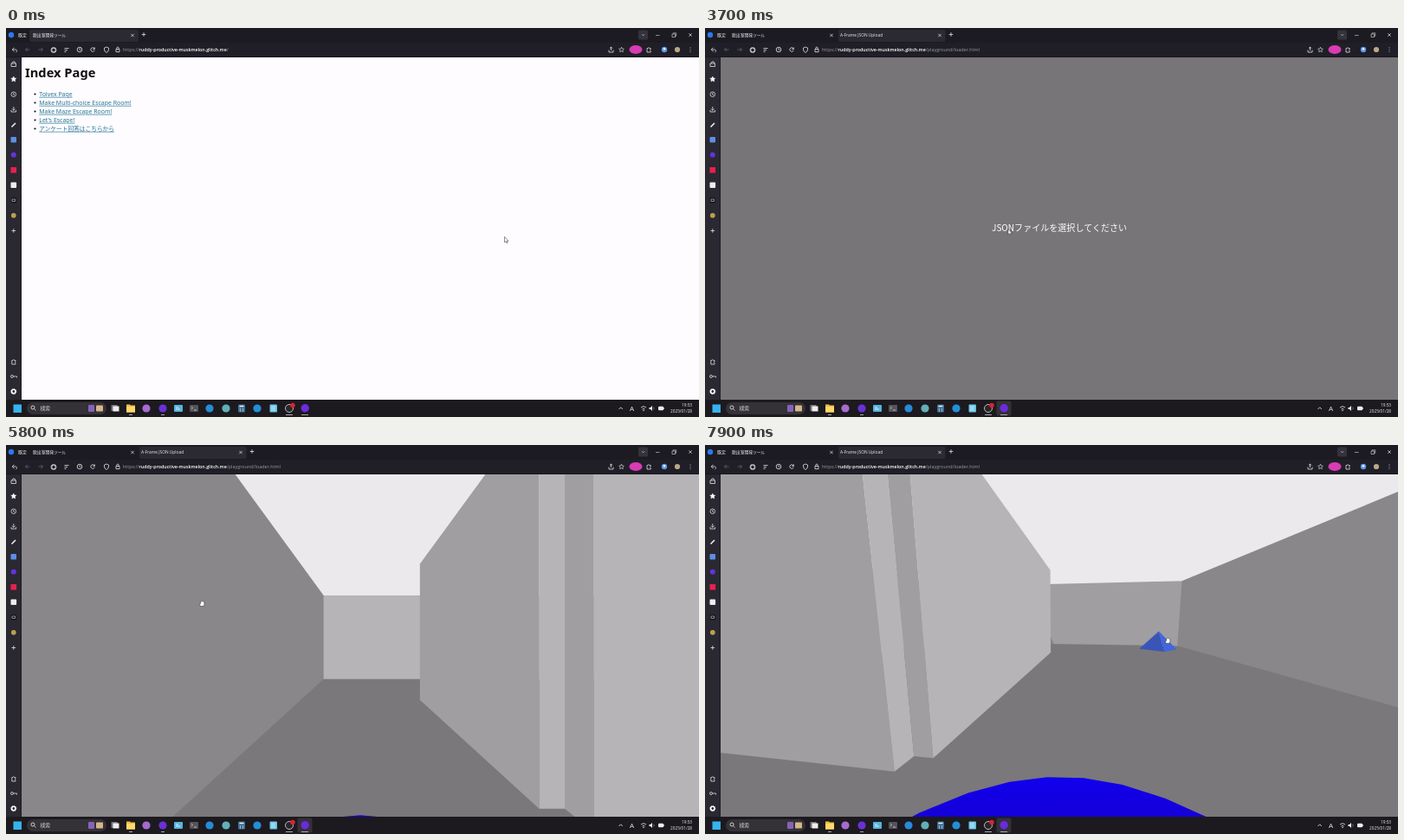
Animation, 800 px wide and 450 px high, one loop 8000 ms. Source, as an HTML page:

```html
<!DOCTYPE html>
<html lang="ja">
<head>
<meta charset="utf-8">
<style>
html, body { margin: 0; width: 100%; height: 100%; overflow: hidden; background: #1c1b22; }
svg { display: block; width: 800px; height: 450px; }
text { font-family: "Open Sans", "Noto Sans CJK JP", "Noto Sans CJK", sans-serif; font-feature-settings: "palt"; white-space: pre; }
.page { font-family: "Noto Sans", "Noto Sans CJK JP", "Noto Sans CJK", sans-serif; font-feature-settings: normal; }
.prompt { font-family: "Noto Sans CJK JP", "Noto Sans CJK", sans-serif; font-feature-settings: normal; }
</style>
</head>
<body>
<svg id="stage" viewBox="0 0 800 450"></svg>
<script>
const LOOP = 8000;
const TAB_OPEN = 1200, PAGE_READY = 2000, DIALOG_OPEN = 4100, DIALOG_CLOSE = 5250;
const HOST = "ruddy-productive-muskmelon.glitch.me";

const rect = (x, y, w, h, fill, more = "") => `<rect x="${x}" y="${y}" width="${w}" height="${h}" fill="${fill}" ${more}/>`;
const circle = (x, y, r, fill, more = "") => `<circle cx="${x}" cy="${y}" r="${r}" fill="${fill}" ${more}/>`;
const text = (x, y, size, fill, str, more = "") => `<text x="${x}" y="${y}" font-size="${size}" fill="${fill}" ${more}>${str}</text>`;
const line = (d, color = "#e4e2e6", width = 0.8) => `<path d="${d}" fill="none" stroke="${color}" stroke-width="${width}" stroke-linejoin="round"/>`;
const shape = (d, fill) => `<path d="${d}" fill="${fill}"/>`;
const group = (id, body) => `<g id="${id}">${body}</g>`;
const cross = (x, y, r = 1.7, width = 0.7) => line(`M${x - r} ${y - r}l${2 * r} ${2 * r}m0 ${-2 * r}l${-2 * r} ${2 * r}`, "#eee", width);
const plus = (x, y, r = 2.3) => line(`M${x - r} ${y}h${2 * r}M${x} ${y - r}v${2 * r}`);
const arrow = (x, y, dir, color) => line(`M${x - 2.5 * dir} ${y}h${5 * dir}m${-2.2 * dir} -2.2l${2.2 * dir} 2.2l${-2.2 * dir} 2.2`, color);
const chevron = (x, y, color = "#ccc") => line(`M${x - 1.5} ${y - 0.7}l1.5 1.5l1.5 -1.5`, color, 0.6);
const reload = (x, y, r = 2.3) => line(`M${x + r} ${y - 0.8}A${r} ${r} 0 1 0 ${x + r} ${y + 0.8}M${x + r} ${y - 2.6}v2h-2`);
const puzzle = (x, y) => line(`M${x - 2} ${y - 1.5}h1.2q.8 -2 1.6 0h1.4v1.5q-1.6 .7 0 1.5v1.5h-4.2z`);
const star = (x, y, r, fill) => {
  const pts = Array.from({ length: 10 }, (_, i) => {
    const a = i * Math.PI / 5, q = i % 2 ? r * 0.48 : r;
    return `${x + q * Math.sin(a)},${y - q * Math.cos(a)}`;
  });
  return `<polygon points="${pts.join(" ")}" fill="${fill}" stroke="#eee" stroke-width=".6"/>`;
};

function browserFrame() {
  return rect(0, 0, 800, 34, "#1c1b22") + rect(0, 17, 800, 17, "#201f27") + rect(0, 34, 18, 396, "#2a2831")
    + line("M17.7 34V430M0 33.7H800", "#15141a", 0.6)
    + circle(6, 8, 3.2, "#2b79ee") + text(14, 10.2, 4.9, "#eee", "既定")
    + rect(730, 2.5, 11, 11, "#34323b", 'rx="1.5"') + chevron(735.7, 8, "#fff")
    + line("M750 8.5h4.5M769 7h3.5v3.5h-3.5zM770.2 7V5.8h3.5v3.5h-1.2", "#ddd", 0.6) + cross(790, 8)
    + line("M7.5 25h4a1.6 1.6 0 0 1 0 3M9.5 22.7l-2.3 2.3l2.3 2.2") + arrow(25, 25, -1, "#66646d") + arrow(40, 25, 1, "#66646d")
    + line("M53 23h4v5h-4zM52 25.5a3 2.5 0 0 1 6 0a3 2.5 0 0 1-6 0M67.5 23.5h5M67.5 25.5h3.5M67.5 27.5h2")
    + circle(85, 25, 2.8, "none", 'stroke="#eee" stroke-width=".8"') + line("M85 23.3V25l1.3 .7")
    + line("M698.5 26V22m-1.6 1.6l1.6-1.6l1.6 1.6M696 25.5v2.5h5v-2.5") + star(710.5, 25.2, 3, "none")
    + `<ellipse cx="727" cy="25" rx="7.5" ry="5" fill="#d83cb5"/>` + puzzle(742, 25)
    + circle(760, 25, 3.2, "#5e98e8") + circle(760, 24.2, 1.2, "#fff") + circle(775, 25, 3.1, "#b9a887")
    + [22.7, 25, 27.3].map(y => circle(790, y, 0.5, "#ddd")).join("");
}

function sidebar() {
  return line("M6 41h5.5v3.5h-5.5zM7 41l1-2h2l1 2") + star(8.8, 59.3, 3.2, "#fff")
    + circle(8.8, 76.7, 2.8, "none", 'stroke="#ddd" stroke-width=".8"') + line("M8.8 75v2l1.3 .6")
    + line("M8.8 91v4.3m-1.8-1.8l1.8 1.8l1.8-1.8M6 95v2h5.6v-2") + line("M6.5 114.5l4.5-4.5", "#eee", 1.6)
    + rect(5.5, 126, 6.5, 6.5, "#5d8ee4", 'rx="1"') + circle(8.8, 146.7, 3, "#6632df") + rect(5.5, 161, 6.6, 6.6, "#e9204f")
    + rect(5.5, 178.5, 6.6, 6.6, "#eee", 'rx="1"') + rect(5.8, 196.2, 6, 6, "#111015", 'rx="1.2"')
    + line("M7 198h3.6v2.5h-3.6z", "#ddd", 0.6) + circle(8.8, 216.8, 2.9, "#bba04f") + plus(8.8, 234.5)
    + puzzle(8.8, 386) + circle(7, 403, 1.5, "none", 'stroke="#ddd" stroke-width=".8"') + line("M8.5 403h4v1.5")
    + circle(8.8, 420.5, 2.2, "none", 'stroke="#fff" stroke-width="1.6"')
    + circle(8.8, 420.5, 3.1, "none", 'stroke="#fff" stroke-width=".8" stroke-dasharray="1.2 1.2"');
}

function taskbar() {
  const apps = [[162, "#a56bd0"], [181, "#6930d8"], [235, "#268bd8"], [254, "#63aeb8"], [290, "#238fd7"]];
  return rect(0, 430, 800, 20, "#1c1a1e") + rect(8.5, 435.5, 9.5, 9.5, "#36b2ee")
    + rect(24, 433, 92, 14, "#343237", 'rx="7"') + circle(31, 439, 2, "none", 'stroke="#eee" stroke-width=".8"') + line("M32.5 440.5l2 2")
    + text(39.5, 442, 5.8, "#d4d2d6", "検索") + rect(95, 436, 7, 8, "#8762b9", 'rx="1"') + rect(104, 436.5, 8, 7, "#d6b689", 'rx="1"')
    + rect(121.5, 436, 7, 7, "#77757a") + rect(123.5, 437.5, 7, 6, "#eee")
    + shape("M139 435.5h4l1 1h5v8h-10z", "#efbd3e") + rect(139, 438, 10, 6.5, "#ffd86c", 'rx=".6"')
    + apps.map(([x, c]) => circle(x, 440, 4.6, c)).join("")
    + rect(194, 436, 10, 8, "#56b4dc", 'rx="1"') + line("M196 439h3M196 441h5", "#fff")
    + rect(212, 436, 10, 8, "#55535a", 'rx="1"') + line("M214 438l1.5 1.5l-1.5 1.5M217 442h3", "#fff", 0.6)
    + rect(268, 435.5, 8, 9, "#3e6f94", 'rx="1"') + line("M269.5 437.5h5", "#eee", 1.5) + line("M270 441h1m2 0h1m-4 2h1m2 0h1", "#eee", 1)
    + rect(304.5, 435.5, 8.5, 9, "#6ac4e4", 'rx="1"') + line("M306 438h5m-5 2h5m-5 2h5", "#e9faff", 0.7)
    + circle(327, 440, 4.5, "#28262b", 'stroke="#ddd" stroke-width=".8"') + circle(331, 436.5, 2.7, "#df2235")
    + group("activeApp", rect(336.5, 431.5, 17, 17, "#343137", 'rx="2"')) + circle(345.2, 439.8, 4.7, "#6a2be0")
    + [[144, 2], [181, 2], [327, 4], [345, 4]].map(([x, r]) => line(`M${x - r} 447.5h${2 * r}`, "#aaa8b1", 1)).join("")
    + line("M707.5 441l2.2-2.2l2.2 2.2", "#eee") + text(720, 443, 8, "#eee", "A")
    + line("M733 439a4.5 4.5 0 0 1 6 0M734.5 441a2.5 2.5 0 0 1 3 0", "#eee") + circle(736, 442.5, 0.7, "#eee")
    + shape("M742.5 439h1.5l2-2v6l-2-2h-1.5z", "#eee") + line("M747.5 438.5q1.5 1.5 0 3", "#aaa", 0.6)
    + rect(753, 437.7, 6, 4.5, "#eee", 'rx="1"') + rect(759.3, 439, 0.7, 2, "#eee")
    + text(792, 438.4, 4.7, "#f1eff3", "19:53", 'text-anchor="end"') + text(792, 445.3, 4.7, "#f1eff3", "2025/01/28", 'text-anchor="end"');
}

function indexPage() {
  const links = ["Tolvex Page", "Make Multi-choice Escape Room!", "Make Maze Escape Room!", "Let's Escape!", "アンケート回答はこちらから"];
  return rect(18, 34, 782, 396, "#fefcfe") + text(22, 57, 14.7, "#111", "Index Page", 'class="page" font-weight="700"')
    + links.map((s, i) => circle(33.5, 76.5 + 10 * i, 1.1, "#111")
      + text(38.3, 78.8 + 10 * i, i === 4 ? 6.7 : 6.93, "#287698", s, 'class="page" text-decoration="underline"')).join("");
}

const tabTitle = (x, str) => text(x, 10.2, 4.85, "#f0eef2", str);
const shield = line("M116 22l2.5 1v2q0 2.2-2.5 3.5q-2.5-1.3-2.5-3.5v-2z");
const lock = line("M127 24.5h4v3.2h-4zM127.8 24.5v-1.2a1.2 1.2 0 0 1 2.4 0v1.2");
const url = (x, path) => text(x, 27, 5.45, "#9b99a2", `https://<tspan fill="#fff" font-size="5.3" font-weight="600">${HOST}</tspan>${path}`);

const fileRows = [
  [67, "昨日"], [78, "multiChoice_registry_2025-01-27_08-54-37.json", "2025/01/27 17:54"],
  [87, "multiChoice_registry_2025-01-27_08-32-14.json", "2025/01/27 17:32"],
  [98, "先週"], [109, "maze_registry_2025-01-21_11-38-06.json", "2025/01/21 20:38"],
  [120, "かなり前"], [131, "multiChoice_registry_2024-10-09_05-53-26.json", "2024/10/09 14:53"]
];

function fileDialog() {
  const white = "#f4f2f5";
  const label = (x, y, s, size = 4.5) => text(x, y, size, white, s);
  const box = (x, y, w, h, stroke) => rect(x, y, w, h, "#1b191c", `stroke="${stroke}" stroke-width=".7" rx="1"`);
  const row = ([y, name, date]) => date
    ? shape(`M79 ${y - 3}h3l1.5 1.5v4.5h-4.5z`, "#e6e4e8") + text(86, y + 1.7, 4.66, white, name)
      + text(302.5, y + 1.7, 4.66, white, date) + label(362.5, y + 1.7, "JSON ソース ファイ", 4.4)
    : chevron(75, y) + label(79, y + 2, name, 5.4);
  const places = [[85, "デスクトップ", "#33a3d6"], [95, "ダウンロード", "#43af96"], [105, "ドキュメント", "#7199ba"], [115, "G:¥", "#d3d1d6"]];
  return rect(2.5, 0, 394.5, 222, "#19171a", 'filter="url(#shadow)"') + rect(2.5, 0, 394.5, 35, "#211e22")
    + rect(2.5, 188, 394.5, 34, "#2d2b2e") + circle(10, 6.5, 3, "#6a2be0") + label(15.5, 8.3, "ファイルのアップロード") + cross(390.5, 6)
    + arrow(12, 24, -1) + arrow(26, 24, 1, "#8c8a8f") + chevron(39, 24) + line("M51.5 26.5v-5m-2.2 2.2l2.2-2.2l2.2 2.2")
    + box(60.5, 17, 241.5, 14.5, "#49474b") + line("M67.5 21v4m-2-1.7l2 2l2-2M65 27h5", "#49b99c", 1) + label(73, 26, "›  ダウンロード", 4.7)
    + chevron(279, 24) + reload(294, 24.5, 2) + box(307, 17, 84, 14.5, "#49474b") + text(311, 25.8, 4.5, "#8f8d92", "ダウンロードの検索")
    + circle(386, 23.5, 1.5, "none", 'stroke="#ddd" stroke-width=".6"') + line("M385 24.6l-2 2")
    + label(11, 44, "整理", 4.9) + shape("M23 41h3l-1.5 2z", "#ccc") + label(39, 44, "新しいフォルダー", 4.6)
    + rect(346, 39, 6, 6, "#77757a") + line("M347 41h4m-4 2h4", "#eee", 0.5) + shape("M356 41h3l-1.5 2z", "#ccc")
    + rect(369, 39, 6.5, 6, "#3bade0") + rect(369, 39, 3, 6, "#eee") + circle(387, 42, 3.2, "#2584d1") + text(387, 43.8, 5, "#fff", "?", 'text-anchor="middle"')
    + line("M2.5 48.5H397", "#343235", 0.5) + line("M69.5 49V187.5M299.5 49v10M359.5 49v10", "#4d4b4f", 0.6)
    + rect(4, 50.5, 64, 10, "#3b393d", 'rx="1"') + shape("M14 56l3.5-3.5l3.5 3.5v3h-7z", "#e4bd83") + label(23, 57.3, "ホーム")
    + rect(14, 62, 6.5, 6, "#3391d0", 'rx="1"') + shape("M14.5 67l2.5-3l3 3z", "#d7effa") + label(23, 67.3, "ギャラリー")
    + places.map(([y, s, c]) => rect(14, y - 2.5, 6.5, 5, c, 'rx=".8"') + label(23, y + 2, s) + line(`M63 ${y + 1.5}l3-3m-2 0l2 2`, "#bbb", 1)).join("")
    + rect(14, 132.5, 6.5, 4.5, "#3fabc7") + label(23, 137, "PC", 4.7)
    + label(77, 55.8, "名前") + label(302.5, 55.8, "更新日時") + label(362.5, 55.8, "種類") + chevron(330, 50, "#888")
    + `<rect id="hover" x="70" width="327" height="11" fill="#4a484c"/>`
    + `<svg x="0" y="0" width="397" height="222" style="width:397px;height:222px">${fileRows.map(row).join("")}</svg>`
    + line("M77 184.3H348", "#a3a1a5", 1) + label(57, 198.2, "ファイル名(N):")
    + box(87.5, 192, 218.5, 9.5, "#bbb9bd") + line("M89.5 194v5.5", "#ddd", 0.5) + chevron(302, 196.8)
    + box(311, 192, 78.5, 9.5, "#5a585d") + label(313, 198.3, "*.json", 4.6) + chevron(386, 196.8)
    + box(311.5, 204.5, 36, 9.5, "#d8d6da") + text(329.5, 211, 4.6, white, "開く(O)", 'text-anchor="middle"')
    + box(353, 204.5, 36, 9.5, "#5a585d") + text(371, 211, 4.6, white, "キャンセル", 'text-anchor="middle"')
    + line("M392.5 220l3-3m-1.5 3l1.5-1.5", "#777", 0.6);
}

const stage = document.getElementById("stage");
stage.innerHTML = `<defs><clipPath id="view">${rect(18, 34, 782, 396, "#fff")}</clipPath>
  <filter id="shadow" x="-10%" y="-10%" width="125%" height="135%" color-interpolation-filters="sRGB"><feDropShadow dx="0" dy="9" stdDeviation="8" flood-opacity=".7"/></filter>
  <linearGradient id="ballFill" x1="0" y1="0" x2="0" y2="430" gradientUnits="userSpaceOnUse"><stop offset=".88" stop-color="#1000f0"/><stop offset="1" stop-color="#1500d8"/></linearGradient></defs>`
  + browserFrame() + sidebar()
  + group("firstTab", rect(27, 2, 126, 14, "#2b2932", 'rx="2"') + plus(159, 7.5) + reload(100, 25) + shield + lock + url(135, "/"))
  + group("secondTab", rect(154, 2, 123.5, 14, "#2b2932", 'rx="2"') + cross(271, 8.5) + plus(284, 7.5))
  + tabTitle(31, "脱出室開発ツール") + cross(146, 8.5)
  + group("index", indexPage())
  + group("loading", rect(18, 34, 782, 396, "#2b2932") + circle(158.5, 8.5, 0.8, "#aaa8b0") + tabTitle(165, HOST + "/playg")
    + rect(266.2, 4, 2.5, 9, "#2b2932") + cross(100, 25, 2.2) + circle(117, 25, 2.9, "none", 'stroke="#ddd" stroke-width=".7"')
    + line("M117 24.5v2M117 23v.7") + url(123, "/playground/loader.html")
    + rect(18, 421, 110, 9, "#29272f", 'stroke="#55535c" stroke-width=".5"') + text(20, 427.8, 4.6, "#fff", HOST, 'font-weight="600"'))
  + group("loaded", tabTitle(156, "A-Frame JSON Upload") + reload(100, 25) + shield + lock + url(135, "/playground/loader.html"))
  + group("prompt", rect(18, 34, 782, 396, "#777577") + text(331, 234.8, 10.05, "#fff", "JSONファイルを選択してください", 'class="prompt"'))
  + `<g id="maze" clip-path="url(#view)"></g>` + taskbar() + group("dialog", fileDialog())
  + group("pointer", `<path d="M0 0V6.5L1.5 5.2L2.6 7.4L3.5 7L2.5 4.9H4.5Z" fill="#fff" stroke="#222" stroke-width=".5"/>`)
  + group("hand", `<path d="M-1.6 3.5L-2.8 .8Q-2.5 -.2 -1.5 .8V-2Q-.9 -2.8 -.4 -2Q.2 -3 .8 -2Q1.4 -2.6 1.9 -1.7Q2.7 -2 2.9 -1V1.5L2 3.6Z" fill="#fff" stroke="#222" stroke-width=".5"/>`);

const part = id => document.getElementById(id);
const show = (id, on) => part(id).setAttribute("display", on ? "inline" : "none");

// Piecewise easing through [time, ...values] stops.
function follow(stops, t) {
  let i = 0;
  while (i < stops.length - 2 && t >= stops[i + 1][0]) i++;
  const [a, b] = [stops[i], stops[i + 1]];
  const u = Math.min(1, Math.max(0, (t - a[0]) / (b[0] - a[0])));
  const k = u * u * (3 - 2 * u);
  return a.slice(1).map((v, j) => v + (b[j + 1] - v) * k);
}

const cursorPath = [
  [300, 575.5, 241.5], [1000, 62, 106], [1220, 62, 106], [1600, 294.5, 241.5], [2200, 350, 232.5],
  [4050, 350, 232.5], [4600, 188.5, 118.5], [4900, 150, 108], [5250, 150, 108], [5800, 226, 183], [6700, 291, 204], [7900, 534, 226]
];
const lookPath = [[5950, 0, 0], [6700, 42.6, 3.9], [7850, 82.5, 7]];

// World units are metres, relative to the eye; z points along the first view.
const FLOOR = -1.6, CEILING = 2.4, FOCAL = 236, NEAR = 0.05;
const LIGHT = "#b6b4b7", MID = "#a09ea1", DARK = "#89878a";
const wall = (x1, z1, x2, z2, fill) => ({ fill, pts: [[x1, FLOOR, z1], [x2, FLOOR, z2], [x2, CEILING, z2], [x1, CEILING, z1]] });
const ring = Array.from({ length: 32 }, (_, i) => {
  const a = i * Math.PI / 16;
  return [Math.sin(a), -0.832, Math.cos(a)];
});
const apex = [12, FLOOR + 1, -4], tip = [11, FLOOR, -4];
const faces = [
  { fill: "#7a787a", pts: [[-90, FLOOR, -90], [90, FLOOR, -90], [90, FLOOR, 90], [-90, FLOOR, 90]] },
  wall(-2, 9.75, 14, 9.75, LIGHT),
  wall(13.75, -6, 13.75, 10, MID),
  { fill: "#858386", pts: [[13.7, FLOOR, 2.17], [13.7, FLOOR, 3.8], [13.7, 0.6, 3.2]] },
  wall(-2, -5.75, 13.75, -5.75, DARK),
  wall(-1.75, -6, -1.75, 9.75, DARK),
  { fill: "#3a55b8", pts: [apex, [12, FLOOR, -3], tip] },
  { fill: "#4266dc", pts: [apex, tip, [12, FLOOR, -5]] },
  wall(1.75, 2, 1.75, 6, MID),
  wall(1.75, 2, 2, 2, LIGHT),
  wall(2, 1.75, 2, 2, MID),
  wall(2, 1.75, 10, 1.75, LIGHT),
  { fill: "url(#ballFill)", pts: ring }
];

function clipNear(pts) {
  return pts.flatMap((p, i) => {
    const q = pts[(i + 1) % pts.length], out = p[2] >= NEAR ? [p] : [];
    if ((p[2] >= NEAR) !== (q[2] >= NEAR)) {
      const k = (NEAR - p[2]) / (q[2] - p[2]);
      out.push(p.map((v, j) => v + (q[j] - v) * k));
    }
    return out;
  });
}

function mazeView(yaw, pitch) {
  const [sy, cy, sp, cp] = [Math.sin(yaw), Math.cos(yaw), Math.sin(pitch), Math.cos(pitch)];
  const toCamera = ([x, y, z]) => {
    const ahead = x * sy + z * cy;
    return [x * cy - z * sy, y * cp + ahead * sp, ahead * cp - y * sp];
  };
  const toScreen = ([x, y, d]) => `${(409 + FOCAL * x / d).toFixed(2)},${(232 - FOCAL * y / d).toFixed(2)}`;
  return rect(18, 34, 782, 396, "#ebe9eb") + faces.map(({ fill, pts }) => {
    const visible = clipNear(pts.map(toCamera));
    return visible.length > 2 ? `<polygon points="${visible.map(toScreen).join(" ")}" fill="${fill}"/>` : "";
  }).join("");
}

function draw(t) {
  const [x, y] = follow(cursorPath, t);
  const playing = t >= DIALOG_CLOSE, dialog = t >= DIALOG_OPEN && !playing;
  show("firstTab", t < TAB_OPEN);
  show("index", t < TAB_OPEN);
  show("activeApp", t >= TAB_OPEN);
  show("secondTab", t >= TAB_OPEN);
  show("loading", t >= TAB_OPEN && t < PAGE_READY);
  show("loaded", t >= PAGE_READY);
  show("prompt", t >= PAGE_READY && !playing);
  show("dialog", dialog);
  show("maze", playing);
  show("pointer", !playing);
  show("hand", playing);
  part(playing ? "hand" : "pointer").setAttribute("transform", `translate(${x} ${y})`);
  if (dialog) {
    const row = fileRows.find(r => Math.abs(r[0] - y) < 5.5);
    show("hover", row && x > 70 && x < 397);
    if (row) part("hover").setAttribute("y", row[0] - 5.5);
  }
  if (playing) {
    const [yaw, pitch] = follow(lookPath, t).map(v => v * Math.PI / 180);
    part("maze").innerHTML = mazeView(yaw, pitch);
  }
}

const start = performance.now();
function tick() {
  draw((performance.now() - start) % LOOP);
  requestAnimationFrame(tick);
}
tick();
</script>
</body>
</html>
```
